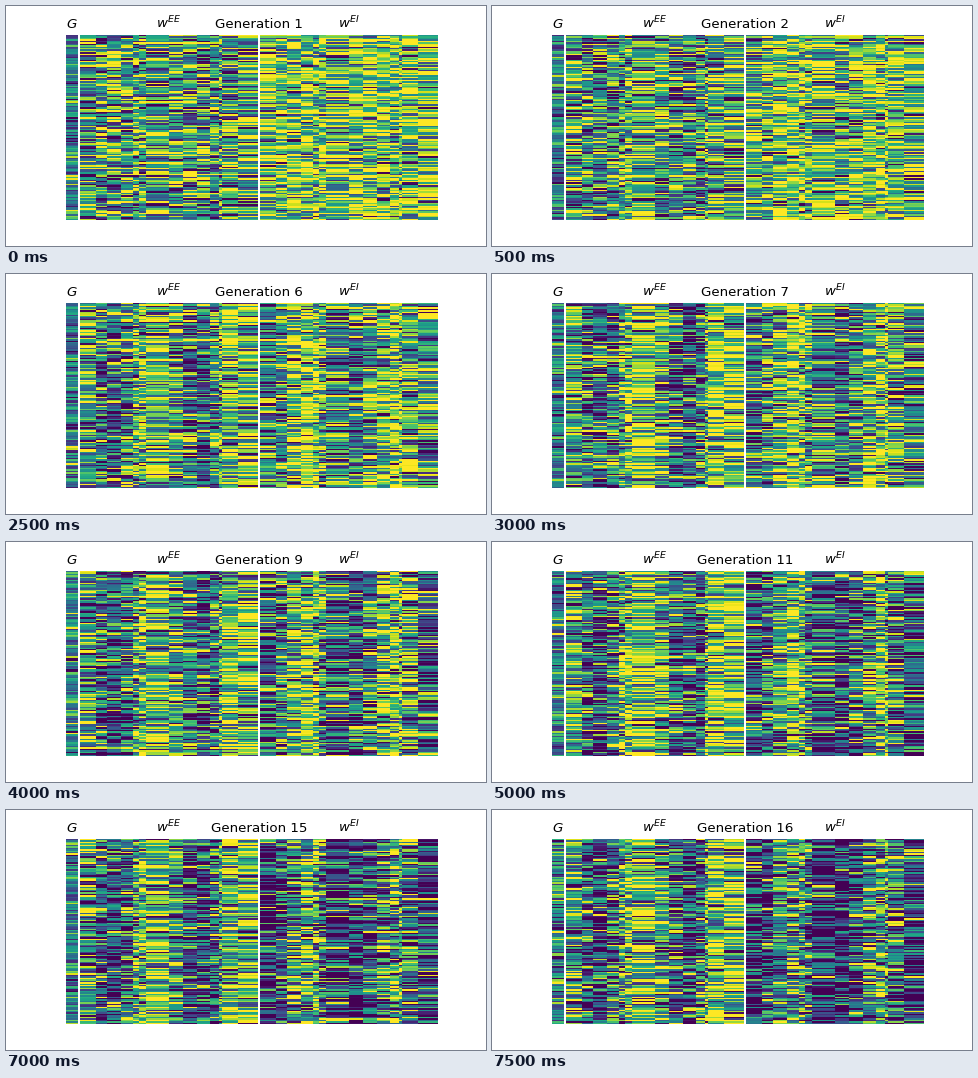
Recreate the animation shown at these times as a matplotlib script. Size 480 px wide and 240 px high, loop 8000 ms.

```python
import numpy as np
import matplotlib.pyplot as plt
from matplotlib.animation import FuncAnimation

GENERATIONS = 16
POPULATION = 128
WIDTHS = [16, 11, 14, 12, 6, 7, 23, 14, 14, 13, 9, 3, 16, 20]
GENES = np.arange(len(WIDTHS))


def gene_means(gen, start, end, peak):
    """Drift from start to end while selection favours genes around the peaks."""
    level = start + (end - start) * gen / (GENERATIONS - 1)
    selection = .26 * (1 - np.exp(-gen / 3))
    return level + selection * np.cos(2 * np.pi * (GENES - peak) / 7)


def weights(rng, means):
    shared = rng.normal(0, .12, (POPULATION, 1))
    own = rng.normal(0, .38, (POPULATION, len(WIDTHS)))
    return np.repeat(np.clip(means + shared + own, 0, 1), WIDTHS, axis=1)


def population(gen):
    rng = np.random.default_rng(40 + gen)
    g = np.clip(rng.normal(.43, .25, (POPULATION, 1)), 0, 1)
    ee = weights(rng, gene_means(gen, .56, .50, peak=5.4))
    ei = weights(rng, gene_means(gen, .74, .38, peak=3.3))
    return g, ee, ei


plt.rcParams["font.family"] = "DejaVu Sans"
fig, axes = plt.subplots(
    1, 3, figsize=(6, 3), dpi=80,
    gridspec_kw={"width_ratios": [1, 15, 15], "wspace": .02})

images = []
for ax, data, name in zip(axes, population(0), ["$G$", "$w^{EE}$", "$w^{EI}$"]):
    images.append(ax.imshow(data, aspect="auto", cmap="viridis", vmin=0, vmax=1,
                            interpolation="nearest"))
    ax.set_title(name, fontsize=12)
    ax.axis("off")

label = fig.text(253 / 480, 1 - 22 / 240, "", fontsize=12, ha="center",
                 va="baseline")


def update(gen):
    for image, data in zip(images, population(gen)):
        image.set_data(data)
    label.set_text(f"Generation {gen + 1}")
    return [*images, label]


anim = FuncAnimation(fig, update, frames=GENERATIONS, interval=500,
                     repeat=True, repeat_delay=0)
plt.show()
```
